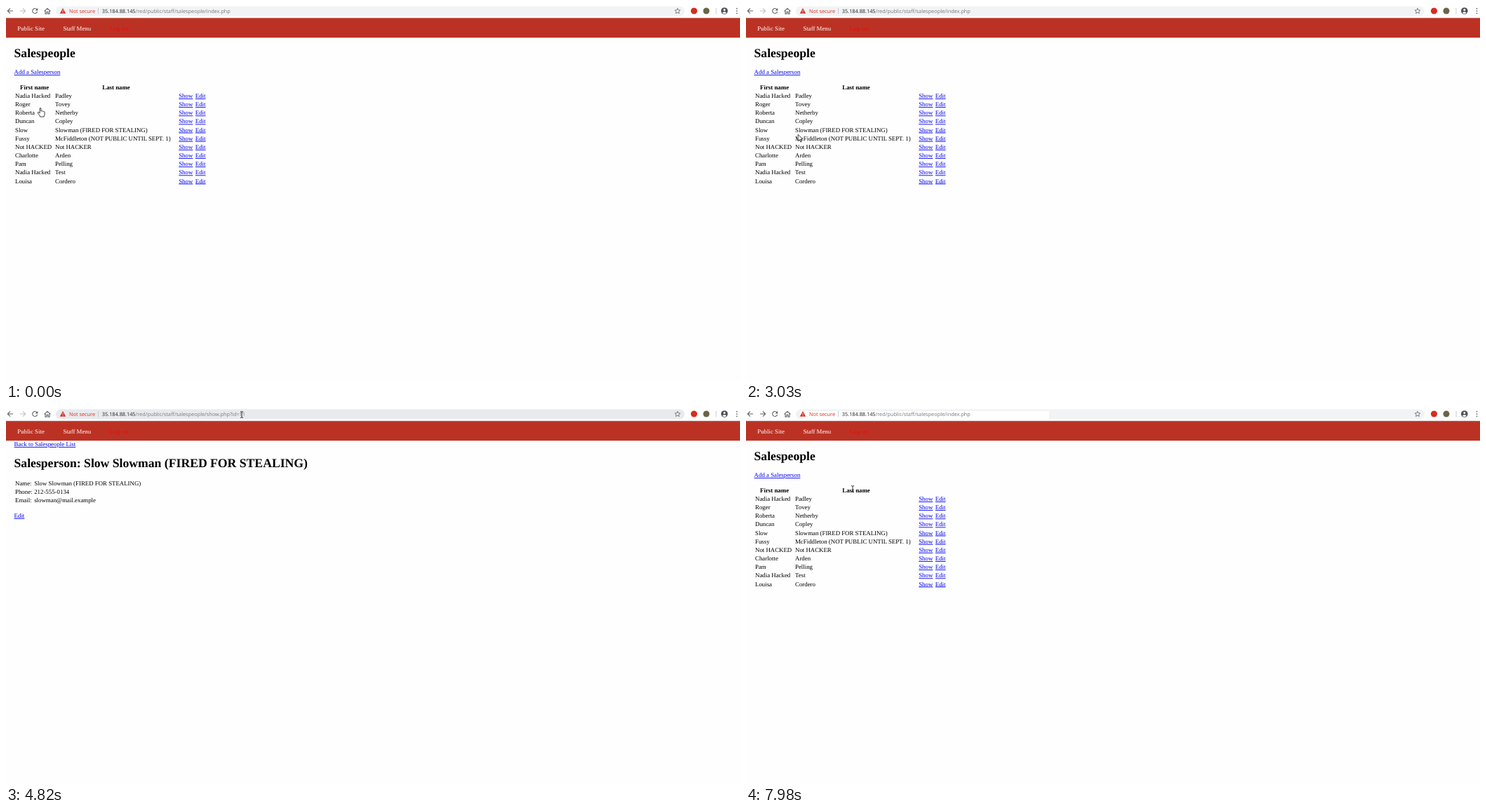
Recreate the animation shown at these times as an HTML page. Size 1046 px wide and 535 px high, loop 8 s.

```html
<!DOCTYPE html>
<html lang="en">
<head>
<meta charset="utf-8">
<title>Salespeople</title>
<style>
  html, body { margin: 0; width: 100%; height: 100%; overflow: hidden; background: #fefefe; }
  svg { display: block; width: 100%; height: 100%; }
  text { font: 8.84px "Liberation Serif", "Times New Roman", serif; white-space: pre; text-rendering: geometricPrecision; }
  .title { font-size: 17.67px; font-weight: bold; }
  .head { font-weight: bold; text-anchor: middle; }
  .link { fill: #00e; text-decoration: underline; }
  .bar { font: 7.33px "Open Sans", "Noto Sans", sans-serif; }
  .icon { fill: none; stroke: #5f6368; stroke-width: 1.1; }
  .pointer { fill: #fff; stroke: #000; stroke-width: .75; stroke-linejoin: round; }
</style>
</head>
<body>
<svg viewBox="0 0 1046 535">
  <rect width="1046" height="535" fill="#fefefe"/>
  <rect id="field" x="71" y="0.5" width="896" height="14" rx="7"/>
  <rect id="blank" x="78" y="3" width="354" height="11.5" fill="#fefefe"/>

  <g class="icon">
    <path d="M10 7H2.5M6 3.3 2.3 7 6 10.7"/>
    <path id="forward" d="M20 7h7.5M24 3.3 27.7 7 24 10.7"/>
    <path d="M44 4.9A3.5 3.5 0 1 0 44.6 8"/>
    <path d="M45.3 3v3.6h-3.6z" fill="#5f6368" stroke="none"/>
    <path d="M54.6 7.4 59 3.4l4.4 4M56 6.6v4.6h2v-3h2v3h2V6.6"/>
    <path d="M957 3.2l1.1 2.6 2.8.2-2.1 1.9.6 2.7-2.4-1.4-2.4 1.4.6-2.7-2.1-1.9 2.8-.2z" stroke-width=".8"/>
  </g>
  <path d="M81 3l4.2 7.8h-8.4z" fill="#d93025"/>
  <path d="M81 5.8v2.4M81 8.9v1" stroke="#fff" stroke-width=".8"/>
  <text class="bar" x="90" y="9.9" fill="#d93025">Not secure</text>
  <path d="M131.5 3v8.5M1012 3v8.5" stroke="#bdc1c6" stroke-width=".8"/>
  <text class="bar" x="136.8" y="9.9" fill="#202124">35.184.88.145<tspan id="path" fill="#777b80"></tspan></text>
  <circle cx="980.5" cy="7" r="4.6" fill="#d62d20"/>
  <circle cx="998" cy="7" r="4.5" fill="#6a6448"/>
  <circle cx="1023.8" cy="7" r="4.8" fill="#4d5156"/>
  <circle cx="1023.8" cy="5.4" r="1.5" fill="#fff"/>
  <path d="M1020.9 9.7q2.9-2.8 5.8 0-2.9 2.4-5.8 0" fill="#fff"/>
  <path d="M1041.5 3.6v.1M1041.5 7v.1M1041.5 10.4v.1" stroke="#5f6368" stroke-width="1.7" stroke-linecap="round"/>

  <rect y="16.5" width="1046" height="1" fill="#dadce0"/>
  <rect y="17.2" width="1046" height="28" fill="#bb3224"/>
  <g fill="#fff">
    <text x="16.3" y="34.8">Public Site</text>
    <text x="81.4" y="34.8">Staff Menu</text>
    <text x="147.6" y="34.8" fill="#f00" opacity=".85">Log out</text>
  </g>

  <g id="list"></g>
  <g id="detail"></g>

  <g id="cursor">
    <path id="arrow" class="pointer" d="M0 0v9.4l2.2-2 1.5 3.4 1.5-.7-1.5-3.3h3z"/>
    <path id="hand" class="pointer" d="M-.9 1Q0-.6 .9 1v4l.4-.2q1-.7 1.6.4 1.1-.6 1.7.5 1.4-.4 1.5 1v2.5q0 1.5-1 2.8v1H-.6v-1Q-2 10.3-3.7 7.4q-.1-1.3 1.1-1L-.9 8z"/>
    <path id="beam" d="M-2-4.5q2 0 2 1.2 0-1.2 2-1.2M0-3.5v7M-2 4.5q2 0 2-1.2 0 1.2 2 1.2" fill="none" stroke="#222" stroke-width=".9"/>
  </g>
</svg>
<script>
const LOOP = 8000, OPEN_PAGE = 4360, LOADED = 4800, GO_BACK = 7460;
const $ = id => document.getElementById(id);
const label = (x, y, content, cls = '') => `<text class="${cls}" x="${x}" y="${y}">${content}</text>`;

const people = [
  ['Nadia Hacked', 'Padley'], ['Roger', 'Tovey'], ['Roberta', 'Netherby'], ['Duncan', 'Copley'],
  ['Slow', 'Slowman (FIRED FOR STEALING)'], ['Fussy', 'McFiddleton (NOT PUBLIC UNTIL SEPT. 1)'],
  ['Not HACKED', 'Not HACKER'], ['Charlotte', 'Arden'], ['Pam', 'Pelling'],
  ['Nadia Hacked', 'Test'], ['Louisa', 'Cordero']
];
const fields = [
  ['Name:', 'Slow Slowman (FIRED FOR STEALING)'],
  ['Phone:', '212-555-0134'],
  ['Email:', 'slowman@mail.example']
];

$('list').innerHTML =
  label(11.5, 73, 'Salespeople', 'title') +
  label(11.6, 97.2, 'Add a Salesperson', 'link') +
  label(40.6, 118.9, 'First name', 'head') +
  label(157, 118.9, 'Last name', 'head') +
  people.map(([first, last], i) => {
    const y = 131 + i * 12.15;
    return label(13, y, first) + label(70, y, last) +
      label(246.2, y, 'Show', 'link') + label(269.8, y, 'Edit', 'link');
  }).join('');

$('detail').innerHTML =
  label(11.6, 53.2, 'Back to Salespeople List', 'link') +
  label(11.5, 82.8, 'Salesperson: Slow Slowman (FIRED FOR STEALING)', 'title') +
  fields.map(([name, value], i) => {
    const y = 108.9 + i * 12.15;
    return label(13, y, name) + label(40.2, y, value);
  }).join('') +
  label(11.6, 154.9, 'Edit', 'link');

// Runs of evenly spaced screen updates: start, end, count.
const bursts = [
  [280, 1270, 8], [1390, 2330, 8], [2480, 3450, 8], [3600, 4520, 7],
  [4670, 5650, 8], [5790, 6750, 8], [6870, 6870, 1], [7460, 7980, 5]
];

// Pointer waypoints: time, x, y, shape.
const route = [
  [0, 49, 145, 'hand'], [280, 62, 100, 'arrow'], [421, 120, 49, 'arrow'], [563, 220, 80, 'arrow'],
  [704, 259, 150, 'arrow'], [846, 225, 230, 'arrow'], [987, 140, 254, 'arrow'], [1270, 91.5, 182, 'arrow'],
  [1390, 60, 130, 'arrow'], [1524, 120, 88, 'arrow'], [1658, 214, 125, 'arrow'], [1792, 195, 200, 'arrow'],
  [1927, 110, 241, 'arrow'], [2195, 3, 190, 'arrow'], [2480, 28, 177, 'arrow'], [2757, 222, 182, 'arrow'],
  [3030, 74.5, 183, 'arrow'], [3310, 50, 203, 'arrow'], [3450, 110, 180, 'arrow'], [3600, 190, 178, 'arrow'],
  [3753, 255, 177, 'hand'], [4360, 256, 176, 'arrow'], [4520, 262, 166, 'arrow'],
  [4670, 342, 21, 'arrow'], [4810, 336, 8, 'beam'], [5230, 322, 7, 'beam'], [5500, 338, 7, 'beam'],
  [5790, 325.3, 7.3, 'beam'], [6060, 335, 8, 'beam'], [6200, 290, 22, 'arrow'],
  [6610, 105, 50, 'arrow'], [6750, 164, 35, 'hand'], [6870, 121.5, 29.5, 'hand'],
  [7460, 124, 42, 'arrow'], [7980, 152, 114, 'beam']
];

// Updates fall on a 10 ms clock, so each may come a little before its even share.
function snap(t) {
  let shown = 0;
  for (const [start, end, count] of bursts) {
    if (t < start) break;
    const gap = (end - start) / (count - 1) || 1;
    shown = start + Math.min(count - 1, Math.floor((t - start + 6) / gap)) * gap;
  }
  return shown;
}

function pointerAt(t) {
  const next = route.findIndex(point => point[0] > t + 6);
  if (next < 0) return route[route.length - 1].slice(1);
  const [t0, x0, y0, shape] = route[next - 1];
  const [t1, x1, y1] = route[next];
  const k = Math.max(0, (t - t0) / (t1 - t0));
  return [x0 + (x1 - x0) * k, y0 + (y1 - y0) * k, shape];
}

const show = (id, visible) => { $(id).style.display = visible ? '' : 'none'; };

function fieldColor(t, pointerY) {
  if (pointerY < 15) return '#e8eaed';
  return t >= OPEN_PAGE && t < LOADED ? '#fefefe' : '#f1f3f4';
}

function draw(now) {
  const t = snap(now % LOOP);
  const [x, y, shape] = pointerAt(t);
  const wentBack = t >= GO_BACK;
  const onDetail = t >= OPEN_PAGE && !wentBack;

  show('list', !onDetail);
  show('detail', onDetail);
  show('blank', wentBack);
  $('path').textContent = '/red/public/staff/salespeople/' + (onDetail ? 'show.php?id=11' : 'index.php');
  $('forward').style.stroke = wentBack ? '#5f6368' : '#bfc1c4';
  $('field').setAttribute('fill', fieldColor(t, y));

  for (const id of ['arrow', 'hand', 'beam']) show(id, id === shape);
  $('cursor').setAttribute('transform', `translate(${x} ${y})`);
}

const begin = performance.now();
function tick() {
  draw(performance.now() - begin);
  requestAnimationFrame(tick);
}
tick();
</script>
</body>
</html>
```
